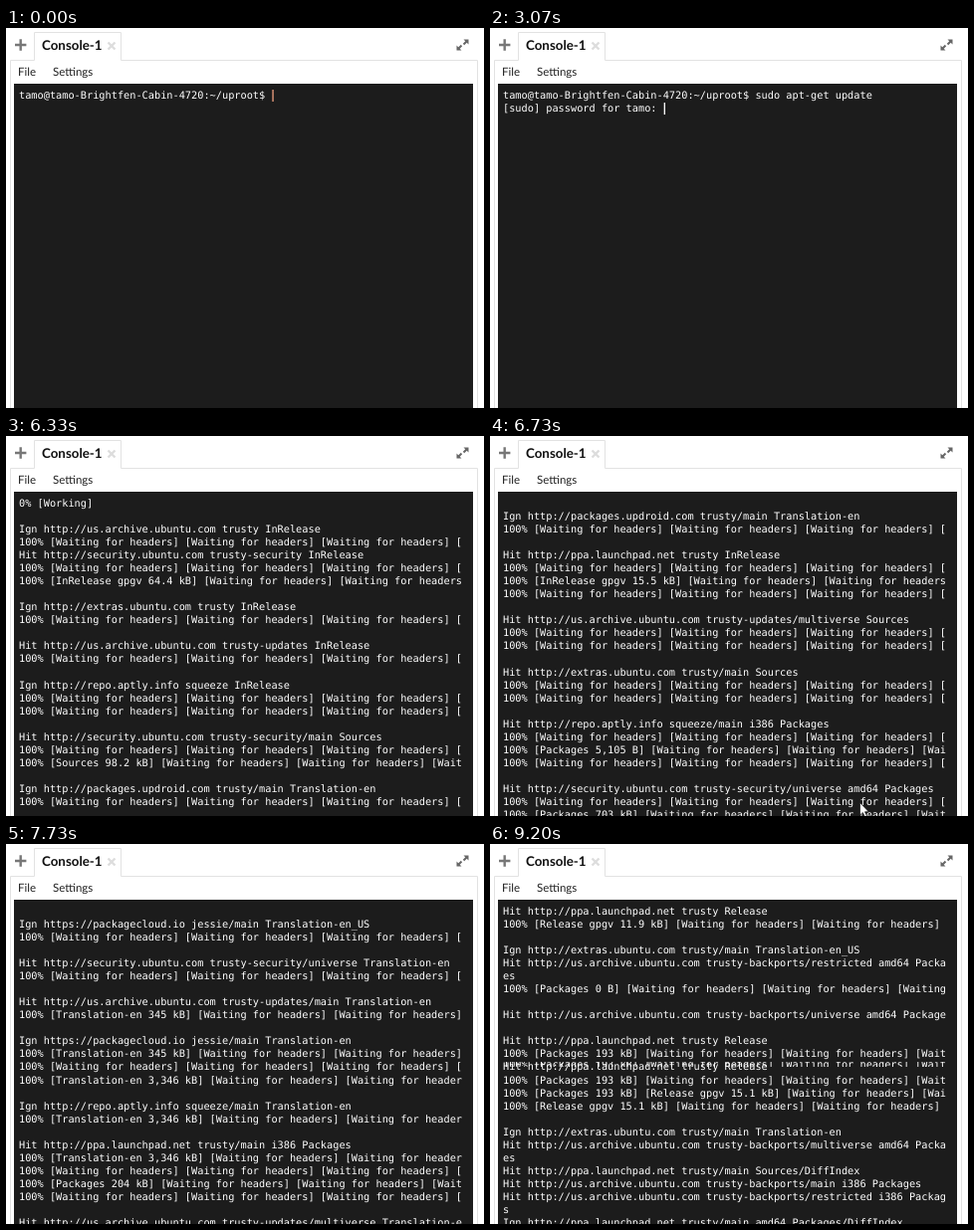
These frames come from a looping animation (480x382 px, 9.27 s). An HTML page:

```html
<!DOCTYPE html>
<html lang="en">
<head>
<meta charset="utf-8">
<title>Console</title>
<style>
  html, body { margin: 0; width: 100%; height: 100%; overflow: hidden; background: #fff; }
  svg { display: block; width: 480px; height: 382px; }
  text { text-rendering: geometricPrecision; white-space: pre; }
  .ui { font-family: Lato, sans-serif; font-size: 11.5px; fill: #222; }
  .tab { font-size: 13.35px; font-weight: bold; fill: #111; }
  .term { font-family: "DejaVu Sans Mono", monospace; font-size: 10.27px; fill: #fff; }
</style>
</head>
<body>
<svg viewBox="0 0 480 382">
  <clipPath id="tearClip"><rect x="8" y="219" width="461" height="5"/></clipPath>
  <path d="M4.5 382V32.5H28.5V4.5H115.5V32.5H473.5V382" fill="none" stroke="#e2e2e2"/>
  <path d="M9 17H20.4M14.7 11.3V22.7" stroke="#777" stroke-width="2.4"/>
  <path d="M102.5 14.5L109.5 21.5M109.5 14.5L102.5 21.5" stroke="#ddd" stroke-width="2.4"/>
  <g fill="#666" stroke="#666">
    <path d="M459.5 11.5H464.5V16.5ZM452.5 17.5V22.5H457.5Z" stroke="none"/>
    <path d="M459.5 16.5L463 13M457.5 17.5L454 21" stroke-width="2"/>
  </g>
  <text class="ui tab" x="36" y="22.3">Console-1</text>
  <text class="ui" x="12" y="47.7">File</text>
  <text class="ui" x="47" y="47.7">Settings</text>
  <rect x="8" y="56" width="461" height="326" fill="#1c1c1c"/>
  <g id="screen" class="term"></g>
  <text id="tear" class="term" x="13" y="224.5" clip-path="url(#tearClip)"></text>
  <rect id="cursor" width="1.3" height="12"/>
  <path id="pointer" d="M371.5 368.5V381L374.3 378.5L376.5 383L378.5 382L376.5 377.8H380.3Z" fill="#fff" stroke="#111" stroke-width=".7"/>
</svg>
<script>
const LOOP = 9270, ROWS = 25, COLS = 72;
const LEFT = 13, ADVANCE = 6.183, BASELINE = 71, PITCH = 13.04;
const PROMPT = 'tamo@tamo-Brightfen-Cabin-4720:~/uproot$ ';
const COMMAND = 'sudo apt-get update';
const PASSWORD = '[sudo] password for tamo: ';
const KEY_TIMES = [400, 870, 1000, 1130, 1330, 1470, 1530, 1730, 1800, 2000,
  2070, 2130, 2270, 2330, 2400, 2530, 2670, 2730, 2800];
const ENTER = 2930, ASK = 3070, OUTPUT = 5866, FIRST_STEP = 88, LAST_STEP = 138;

const HOSTS = {
  u: 'http://us.archive.ubuntu.com', s: 'http://security.ubuntu.com',
  e: 'http://extras.ubuntu.com', p: 'http://ppa.launchpad.net',
  a: 'http://repo.aptly.info', d: 'http://packages.updroid.com',
  c: 'https://packagecloud.io'
};

// H/I + host key: Hit or Ign line. "=": status line. "@n": this row is at the top at step n.
const LOG = `
Iu trusty InRelease
=
Hs trusty-security InRelease
=
=InRelease gpgv 64.4 kB

Ie trusty InRelease
=

Hu trusty-updates InRelease
=

Ia squeeze InRelease
=
=

Hs trusty-security/main Sources
=
=Sources 98.2 kB
@101

Id trusty/main Translation-en
=

Hp trusty InRelease
=
=InRelease gpgv 15.5 kB
=

Hu trusty-updates/multiverse Sources
=
=

He trusty/main Sources
=
=

Ha squeeze/main i386 Packages
=
=Packages 5,105 B
=

Hs trusty-security/universe amd64 Packages
=
=Packages 703 kB
=

Hu trusty-updates/main amd64 Packages
=Packages 703 kB

Hs trusty-security/main i386 Packages
=
=Packages 345 kB

He trusty/main amd64 Packages
=
=

Hs trusty-security/universe i386 Packages
=Packages 127 kB
=

Hu trusty-updates/universe i386 Packages
=
=Packages 877 kB

Hs trusty-security/main Translation-en
=
@116

Ic jessie/main Translation-en_US
=

Hs trusty-security/universe Translation-en
=

Hu trusty-updates/main Translation-en
=Translation-en 345 kB

Ic jessie/main Translation-en
=Translation-en 345 kB
=
=Translation-en 3,346 kB

Ia squeeze/main Translation-en
=Translation-en 3,346 kB

Hp trusty/main i386 Packages
=Translation-en 3,346 kB
=
=Packages 204 kB
=

Hu trusty-updates/multiverse Translation-en
=Translation-en 5,105 B

Hp trusty Release.gpg
=

Hu trusty-updates/restricted Translation-en
@125

=Translation-en 30.3 kB

Hp trusty Release.gpg
Hu trusty-updates/universe Translation-en
=Translation-en 877 kB

Hu trusty-backports/main Sources
=Sources 25.3 kB

Hp trusty Release
=Release gpgv 15.1 kB

Ip trusty Release

Hu trusty-backports/restricted Sources
=Sources 0 B

Hu trusty-backports/universe Sources
=Sources 127 kB

Hp trusty Release
=Release gpgv 15.1 kB

Hu trusty-backports/multiverse Sources
=Sources 5,105 B

Hp trusty Release
=Release gpgv 15.1 kB

Hu trusty-backports/main amd64 Packages
=Packages 30.3 kB

@138
Hp trusty Release
=Release gpgv 11.9 kB

Ie trusty/main Translation-en_US
Hu trusty-backports/restricted amd64 Packages
=Packages 0 B

Hu trusty-backports/universe amd64 Packages
Hp trusty Release
=Packages 193 kB
Hp trusty Release
=Packages 193 kB
=Packages 193 kB|Release gpgv 15.1 kB
=Release gpgv 15.1 kB

Ie trusty/main Translation-en
Hu trusty-backports/multiverse amd64 Packages
Hp trusty/main Sources/DiffIndex
Hu trusty-backports/main i386 Packages
Hu trusty-backports/restricted i386 Packages
Ip trusty/main amd64 Packages/DiffIndex`;

function status(tags) {
  const cells = [...tags.split('|').filter(Boolean), ...Array(4).fill('Waiting for headers')];
  return ('100% ' + cells.map(cell => `[${cell}]`).join(' ')).slice(0, COLS);
}

const rows = [PROMPT + COMMAND, PASSWORD, '0% [Working]'];
const stops = [[FIRST_STEP, rows.length]];
for (const line of LOG.split('\n')) {
  if (line[0] === '@') {
    stops.push([+line.slice(1), rows.length + ROWS]);
  } else if (line[0] === '=') {
    rows.push(status(line.slice(1)));
  } else if (line) {
    const text = `${line[0] === 'H' ? 'Hit' : 'Ign'} ${HOSTS[line[1]]}${line.slice(2)}`;
    rows.push(text.slice(0, COLS));
    // The terminal loses the character that falls on the margin.
    if (text.length > COLS) rows.push(text.slice(COLS + 1));
  } else {
    rows.push('');
  }
}

const byId = id => document.getElementById(id);
const cursor = byId('cursor'), pointer = byId('pointer'), tear = byId('tear');
const lines = Array.from({ length: ROWS }, (_, i) => {
  const el = document.createElementNS('http://www.w3.org/2000/svg', 'text');
  el.setAttribute('x', LEFT);
  el.setAttribute('y', BASELINE + i * PITCH);
  return byId('screen').appendChild(el);
});
tear.textContent = status('Packages 193 kB');

const show = (el, on) => el.setAttribute('visibility', on ? 'visible' : 'hidden');

function rowCount(step) {
  const i = Math.max(1, stops.findIndex(([at]) => at >= step));
  const [[s0, n0], [s1, n1]] = [stops[i - 1], stops[i]];
  return Math.round(n0 + (n1 - n0) * (step - s0) / (s1 - s0));
}

function visibleRows(t, step) {
  if (t >= OUTPUT) {
    const count = rowCount(step);
    return rows.slice(Math.max(0, count - ROWS), count);
  }
  const typed = KEY_TIMES.filter(at => at <= t).length;
  const shown = [PROMPT + COMMAND.slice(0, typed)];
  if (t >= ENTER) shown.push(t >= ASK ? PASSWORD : '');
  return shown;
}

function render(t) {
  const step = Math.min(LAST_STEP, Math.floor(t * 0.015 + 0.06));
  const shown = visibleRows(t, step);
  lines.forEach((el, i) => {
    const text = shown[i] || '';
    if (el.textContent !== text) el.textContent = text;
  });
  const last = shown.length - 1;
  cursor.setAttribute('x', LEFT + shown[last].length * ADVANCE + 0.9);
  cursor.setAttribute('y', 62 + last * PITCH);
  cursor.setAttribute('fill', t < 130 ? '#f0a080' : '#fff');
  show(cursor, step <= FIRST_STEP);
  show(pointer, step >= 98 && step <= 103);
  show(tear, step === LAST_STEP);
}

const start = performance.now();
function tick() {
  render((performance.now() - start) % LOOP);
  requestAnimationFrame(tick);
}
tick();
</script>
</body>
</html>
```
